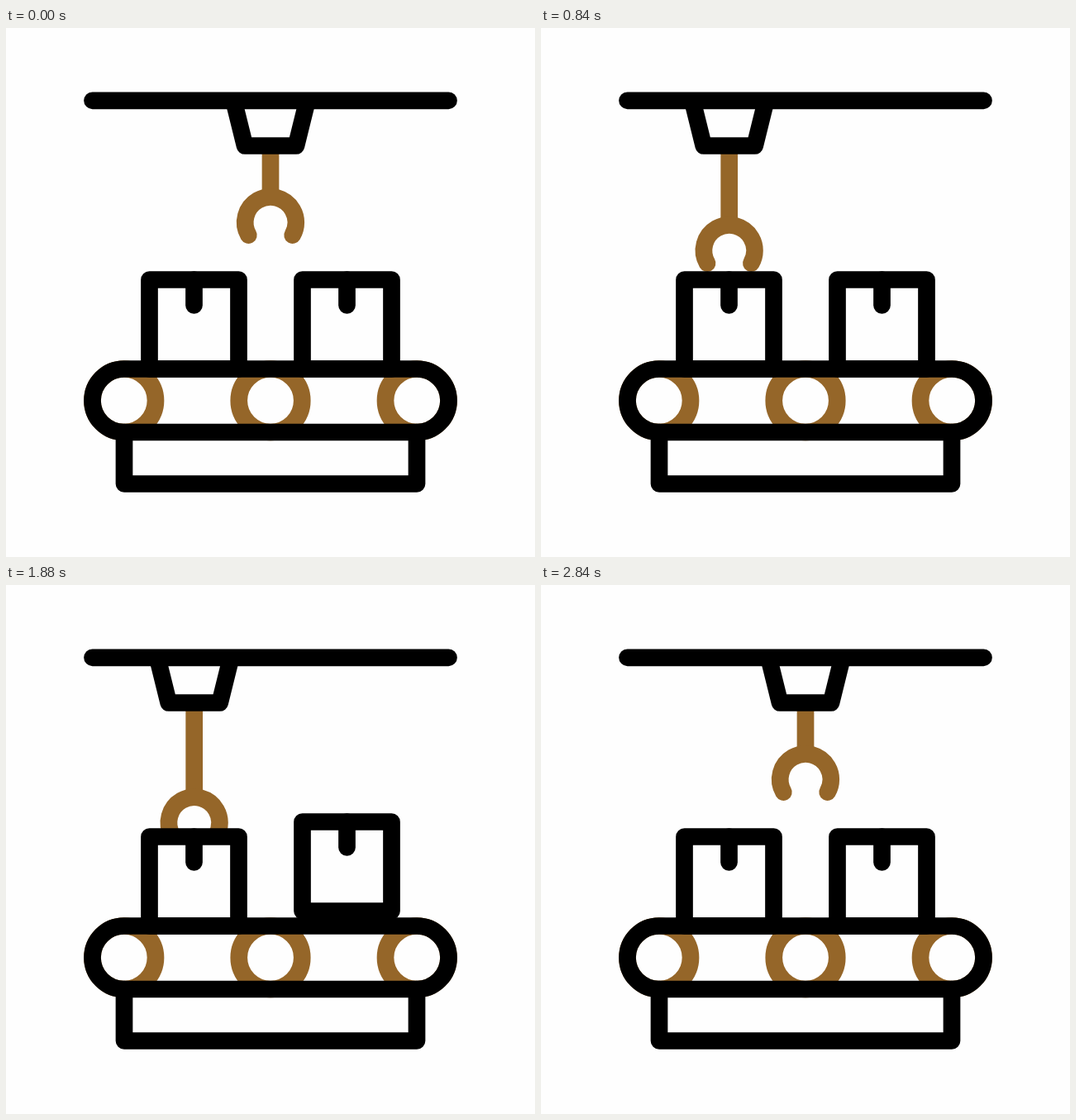
Animation, 640 px wide and 640 px high, one loop 3000 ms. Source, as an HTML page with a canvas:

```html
<!DOCTYPE html>
<html lang="en">
<head>
<meta charset="utf-8">
<title>Conveyor</title>
<style>
html, body { margin: 0; width: 100%; height: 100%; overflow: hidden; background: #fefefe; }
canvas { display: block; width: 640px; height: 640px; }
</style>
</head>
<body>
<canvas id="stage" width="640" height="640"></canvas>
<script>
const ctx = document.getElementById('stage').getContext('2d');
const LOOP = 3000, STEP = 40;
const INK = '#000', BROWN = '#956629', PAPER = '#fefefe';
const HOME = 320, PICK = 227.7, DROP = 52.5;

// Symmetric cubic ease with handles at .55 and .45
function ease(p) {
  if (p <= 0) return 0;
  if (p >= 1) return 1;
  let lo = 0, hi = 1;
  for (let i = 0; i < 24; i++) {
    const s = (lo + hi) / 2, r = 1 - s;
    if (1.65 * s * r * r + 1.35 * s * s * r + s * s * s < p) lo = s; else hi = s;
  }
  return lo * lo * (3 - 2 * lo);
}
const ramp = (t, from, to) => ease((t - from) / (to - from));

function pose(t) {
  const away = ramp(t, 20, 658) - ramp(t, 2180, 2830);
  const down = ramp(t, 658, 978) - ramp(t, 978, 1298)
             + ramp(t, 1540, 1860) - ramp(t, 1860, 2180);
  const held = t > 978 && t < 1860;
  const hop = t >= 1500 ? Math.max(0, 18.25 * (1 - ((t - 1947) / 600) ** 2)) : 0;
  return {
    x: HOME + (PICK - HOME) * away,
    drop: DROP * down,
    lift: held ? DROP * (1 - down) : 0,
    hop
  };
}

function stroke(color, build, cap = 'round') {
  ctx.strokeStyle = color;
  ctx.lineCap = cap;
  ctx.beginPath();
  build();
  ctx.stroke();
}

function line(color, points, cap) {
  stroke(color, () => points.forEach(([x, y]) => ctx.lineTo(x, y)), cap);
}

function hook(x, drop) {
  const y = 235.2 + drop;
  line(BROWN, [[x, 143], [x, y - 30]], 'butt');
  stroke(BROWN, () => ctx.arc(x, y, 30.75, Math.PI * 5 / 6, Math.PI * 13 / 6));
}

function trolley(x) {
  line(INK, [[x - 44.5, 88], [x - 31, 142.5], [x + 31, 142.5], [x + 44.5, 88]], 'butt');
}

function box(x, lift) {
  const y = 304.5 - lift;
  stroke(INK, () => ctx.rect(x - 54, y, 108, 108));
  line(INK, [[x, y], [x, y + 31]]);
}

function conveyor() {
  const mid = 450.75, r = 38.25, left = 142.75, right = 497.25;
  for (const x of [left, HOME, right]) {
    stroke(BROWN, () => ctx.arc(x, mid, r, 0, Math.PI * 2));
  }
  line(INK, [[143, 489], [143, 551.5], [497, 551.5], [497, 489]]);
  stroke(INK, () => {
    ctx.arc(left, mid, r, Math.PI / 2, Math.PI * 1.5);
    ctx.arc(right, mid, r, -Math.PI / 2, Math.PI / 2);
    ctx.closePath();
  });
}

function draw(t) {
  const p = pose(t);
  ctx.fillStyle = PAPER;
  ctx.fillRect(0, 0, 640, 640);
  ctx.lineWidth = 20.7;
  ctx.lineJoin = 'round';
  hook(p.x, p.drop);
  trolley(p.x);
  line(INK, [[104.5, 87.8], [535.5, 87.8]]);
  conveyor();
  box(227.5, p.lift);
  box(412.5, p.hop);
}

const start = performance.now();
function tick() {
  const t = (performance.now() - start) % LOOP;
  draw(Math.floor(t / STEP) * STEP);
  requestAnimationFrame(tick);
}
tick();
</script>
</body>
</html>
```
